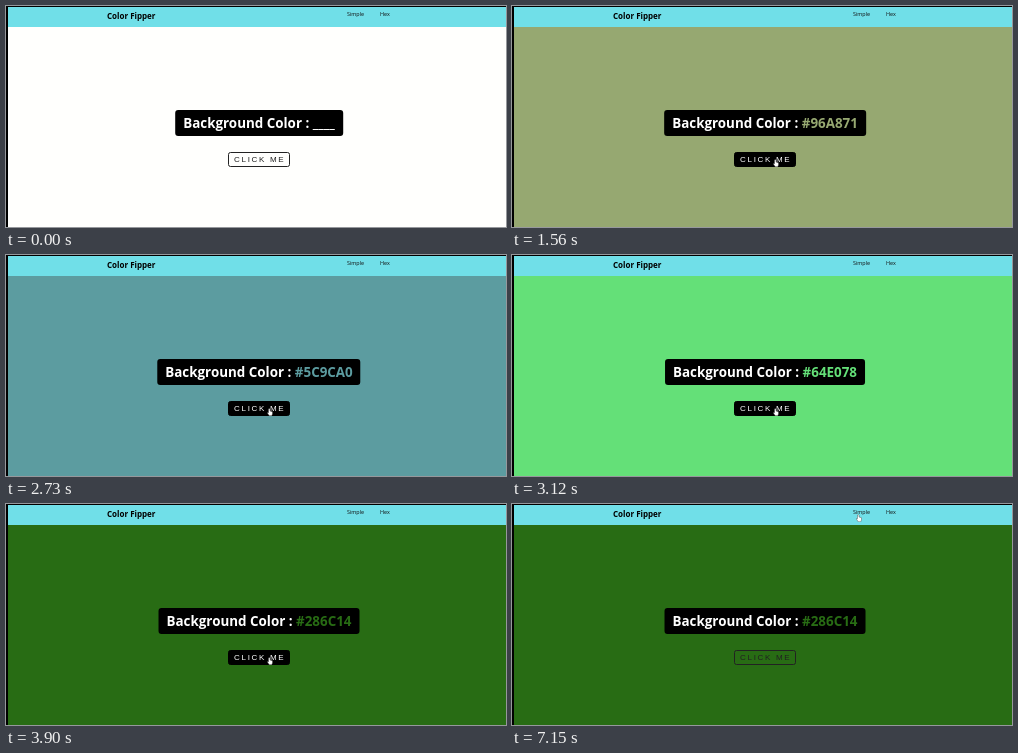
Write an HTML page that moves like this. It is 500 by 221 pixels and loops after 7.41 s.

```html
<!DOCTYPE html>
<html lang="en">
<head>
<meta charset="utf-8">
<title>Color Fipper</title>
<style>
  html, body { margin: 0; width: 100%; height: 100%; overflow: hidden; background: #000; }
  body { position: relative; font-family: "Open Sans", sans-serif; }
  #page { position: absolute; inset: 1px 0 0 2px; }
  #page, #page * { box-sizing: border-box; }
  nav { position: absolute; inset: 0 0 auto; height: 20px; background: #70dfe8; color: #111; }
  nav * { position: absolute; line-height: 10px; white-space: nowrap; }
  nav b { left: 99px; top: 4px; font-size: 8px; color: #000; }
  nav span { top: 2px; font-size: 5.4px; }
  h1, button { position: absolute; left: 251px; margin: 0; transform: translateX(-50%); white-space: nowrap; }
  h1 {
    top: 102.5px; height: 26.5px; padding: 0 8px; border-radius: 3px;
    background: #000; color: #fff; font-size: 13.4px; font-weight: 700; line-height: 26.5px;
  }
  button {
    top: 144.5px; width: 62px; height: 15px; padding: 0 0 0 5px; border: 1px solid #222; border-radius: 2.5px;
    background: transparent; color: #222; text-align: left;
    font: 8px/13px "Liberation Sans", Arial, sans-serif; letter-spacing: 1.7px;
  }
  button.hover { background: #000; border-color: #000; color: #fff; }
  #hand { position: absolute; left: 0; top: 0; width: 6px; height: 8px; }
</style>
</head>
<body>
<div id="page">
  <nav>
    <b>Color Fipper</b>
    <span style="left:339px">Simple</span>
    <span style="left:372px">Hex</span>
  </nav>
  <h1>Background Color : <span id="code"></span></h1>
  <button>CLICK ME</button>
</div>
<svg id="hand" viewBox="0 0 12 16">
  <path d="M3 2Q4.5 0 6 2V6L11 7.500V12L9.500 15.500H4.500L1 10.500Q0 8 3 9.500Z" fill="#fff" stroke="#333" stroke-width=".8"/>
</svg>
<script>
const LOOP = 7410, STEP = 130;

// [time of click, new background]
const clicks = [
  [910, "#A8C4B2"], [1170, "#B09C84"], [1560, "#96A871"], [1820, "#9C6A92"], [2080, "#C80AD6"],
  [2470, "#8E5CB4"], [2730, "#5C9CA0"], [2990, "#64E078"], [3510, "#5AA05C"], [3900, "#286C14"]
];

// [time, x, y] of the pointer's centre
const path = [
  [0, 345, 235], [130, 330, 216], [780, 264, 157], [3900, 264, 157], [4290, 350, 18],
  [4420, 350, 18], [4550, 353, 14], [4810, 353, 14], [4940, 350, 13], [5070, 350, 13],
  [5200, 351, 13], [5720, 351, 13], [6110, 354, 15], [6500, 347, 14], [LOOP, 347, 14]
];

const page = document.getElementById("page");
const code = document.getElementById("code");
const hand = document.getElementById("hand");
const button = document.querySelector("button");

function pointerAt(t) {
  const i = path.findIndex(p => p[0] > t);
  const [t0, x0, y0] = path[i - 1], [t1, x1, y1] = path[i];
  const k = (t - t0) / (t1 - t0);
  return [x0 + (x1 - x0) * k, y0 + (y1 - y0) * k];
}

function draw(now) {
  const t = Math.floor(now % LOOP / STEP) * STEP;
  const click = clicks.filter(c => c[0] <= t).pop();
  const color = click ? click[1] : "";
  const [x, y] = pointerAt(t);

  page.style.background = color || "#fffffd";
  code.style.color = color || "#fff";
  code.textContent = color || "____";
  hand.style.transform = `translate(${x - 3}px, ${y - 4}px)`;
  button.classList.toggle("hover", x > 222 && x < 284 && y > 146 && y < 161);
}

const start = performance.now();
function tick() {
  draw(performance.now() - start);
  requestAnimationFrame(tick);
}
tick();
</script>
</body>
</html>
```
